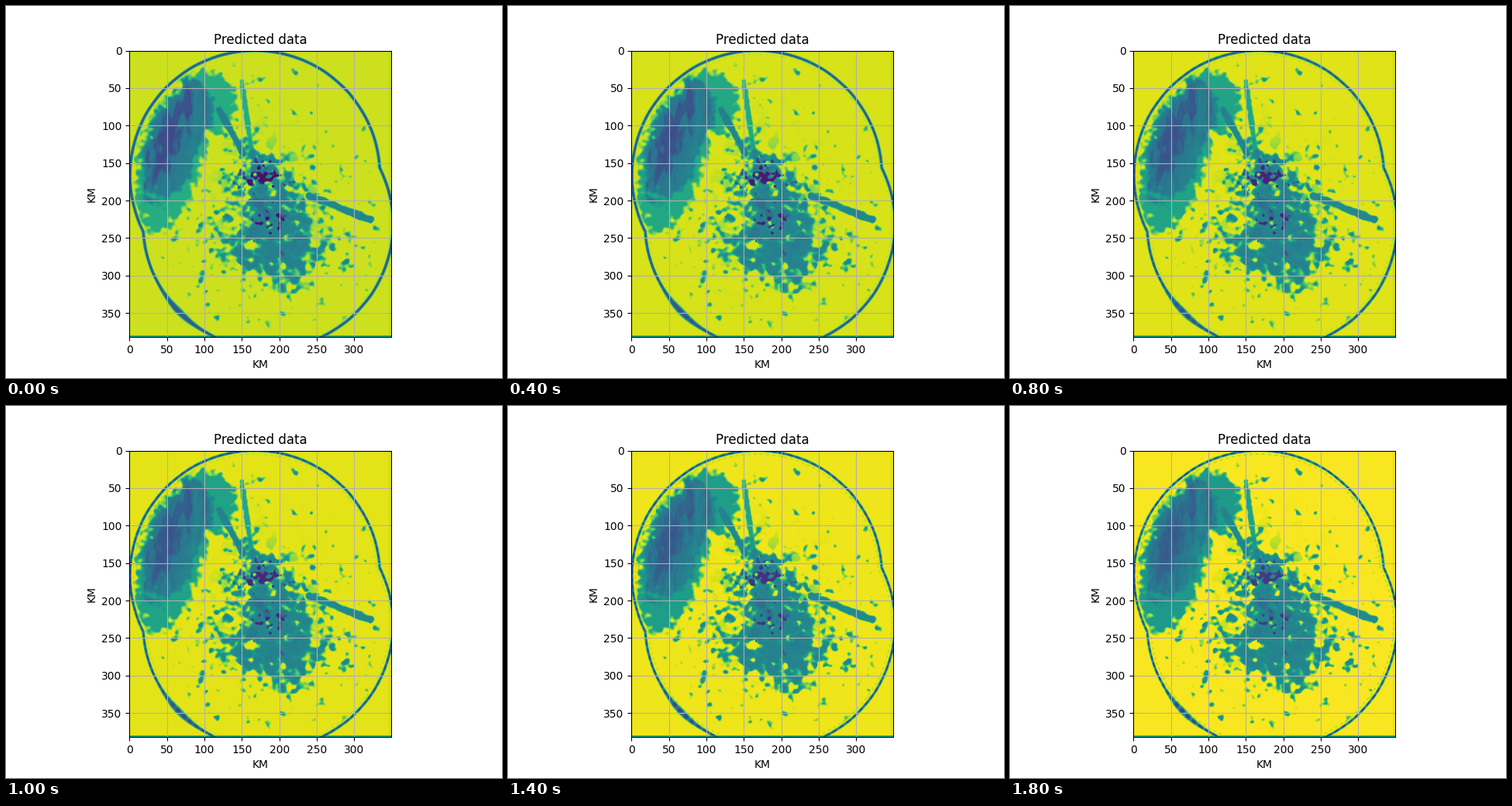
These frames come from a looping animation (640x480 px, 2 s). A matplotlib script:

```python
import numpy as np
import matplotlib.pyplot as plt
from matplotlib.animation import FuncAnimation

W, H = 349, 382
FRAMES = 10
RADARS = [(167, 165), (184.5, 229.5)]
RANGE = 166.5

rng = np.random.default_rng(11)
yy, xx = np.mgrid[0:H, 0:W].astype(float)
fy = np.fft.fftfreq(H)[:, None]
fx = np.fft.fftfreq(W)[None, :]


def noise(sx, sy):
    """Unit-variance Gaussian noise with the given grain size."""
    kernel = np.exp(-2 * np.pi ** 2 * ((sx * fx) ** 2 + (sy * fy) ** 2))
    a = np.fft.ifft2(np.fft.fft2(rng.standard_normal((H, W))) * kernel).real
    return a / a.std()


def hill(x, y, sx, sy, height=1):
    return height * np.exp(-((xx - x) / sx) ** 2 / 2 - ((yy - y) / sy) ** 2 / 2)


def oval(x, y, a, b, lean=0):
    """1 at the centre of a sheared ellipse, 0 on its rim, negative outside."""
    u = (xx - x - lean * (yy - y)) / a
    return 1 - np.hypot(u, (yy - y) / b)


def beam(degrees, near, far, width):
    """Soft-edged radial streak seen from the first radar."""
    a = np.radians(degrees)
    dx, dy = xx - RADARS[0][0], yy - RADARS[0][1]
    along = dx * np.cos(a) + dy * np.sin(a)
    off = np.hypot(dy * np.cos(a) - dx * np.sin(a),
                   along - np.clip(along, near, far))
    return unit((width - off - 0.7 * fine) / 1.8 + 0.5)


def unit(a):
    return np.clip(a, 0, 1)


def mix(a, b, t):
    return a + (b - a) * t


fine = 0.87 * noise(2.5, 2.3) + 0.5 * noise(6, 6)
grain, patch, grooves = noise(1.9, 1.9), noise(4, 4), noise(1.6, 5)

edge = np.min([np.hypot(xx - x, yy - y - 1.5) for x, y in RADARS],
              axis=0) - RANGE
angle = np.arctan2(yy - 199, xx - 175)
cover = unit((-edge - 2) / 3)

# Large rain band in the north-west, with heavier zones inside it
band = np.maximum(oval(58, 138, 43, 102, -.25), oval(102, 70, 42, 42))
rain = unit((band + 0.08 * fine) * 7 + 0.5)
heavy = np.maximum(oval(58, 125, 36, 80, -.25), oval(85, 80, 26, 42))
heavy = unit((heavy + 0.07 * fine) * 6 + 0.5)
core = np.maximum(oval(48, 125, 16, 48, -.25), oval(78, 75, 5, 34))
core = unit((core + 0.3 * grooves) * 1.5 + 0.4)

# Scattered showers: noise cut by a level that drops near the radars
wet = (fine - 2.1 + hill(195, 220, 46, 58, 2.9) + hill(215, 275, 54, 33, 1.6)
       + hill(172, 152, 32, 28, 1.5) + hill(100, 240, 65, 38, 1.2)
       + hill(220, 240, 100, 85, 0.5) + hill(145, 80, 30, 60, 0.8))
dense = hill(185, 200, 34, 42)
dark = (grain - 2.6 + sum(hill(x + 6, y, 24 - 8 * i, 17 - 4 * i, 3.1)
                          for i, (x, y) in enumerate(RADARS)))
beams = [(241, 32, 98, 4.2, .42), (262, 25, 125, 3, .6), (21.5, 78, 165, 4.3, .43)]
beams = [(beam(*b[:4]), b[4]) for b in beams]


def radar_map(k):
    """Predicted field at step k: echoes even out and sharpen with time."""
    t = k / (FRAMES - 1)
    base = (235.5 + 1.85 * k) / 255
    v = np.full((H, W), base)

    tone = mix(.64, .57, t) - mix(.20, .12, t) * unit(wet / 2)
    v = mix(v, tone, unit(wet / mix(1.3, .9, t) + .1) * cover)

    body = mix(mix(.62, .54, t), .42, heavy)
    body = mix(body, mix(.23, .29, t), core * heavy)
    body = body + mix(.015, .028, t) * grooves * heavy
    v = mix(v, body, rain * cover)

    for shape, tint in beams:
        v = mix(v, np.minimum(v, mix(tint, .48, .4 * t)), shape * .95)

    v = mix(v, np.minimum(v, .34), unit(patch * 1.5 - 1) * dense * .8)
    v = mix(v, mix(.05, .17, t), unit(dark / .7) * unit(dense * 2))
    for x, y in RADARS:
        r = np.hypot(xx - x + 1.5 * t, yy - y)
        v = mix(v, .9, np.exp(-(r / 2.6) ** 4))

    # Range ring, thicker in the south-west, with a dotted inner echo
    dash = 1 - .3 * t * (np.sin(110 * angle) > .3)
    width = mix(1.9, 1.5, t) + 2.2 * np.exp(-((angle - 2.2) / .14) ** 2)
    v = mix(v, mix(.27, .18, t), np.exp(-(edge / width) ** 4) * dash)
    echo = np.exp(-((edge + 4.5) / .7) ** 2) * (np.sin(150 * angle) > 0)
    v = mix(v, .75, echo * mix(.15, .6, t))

    v[-2:] = np.minimum(v[-2:], .62)
    v[:, 0] = np.minimum(v[:, 0], .72)
    v[:, -3] = np.minimum(v[:, -3], base - .06)
    return unit(v)


maps = [radar_map(k) for k in range(FRAMES)]

fig, ax = plt.subplots(figsize=(6.4, 4.8), dpi=100)
image = ax.imshow(maps[0], cmap="viridis", vmin=0, vmax=1,
                  extent=(0, W, H, 0))
ax.set_title("Predicted data")
ax.set_xlabel("KM")
ax.set_ylabel("KM")
ax.grid(True)


def update(k):
    image.set_data(maps[k])
    return [image]


anim = FuncAnimation(fig, update, frames=FRAMES, interval=200, repeat=True,
                     repeat_delay=0, blit=False)
plt.show()
```
